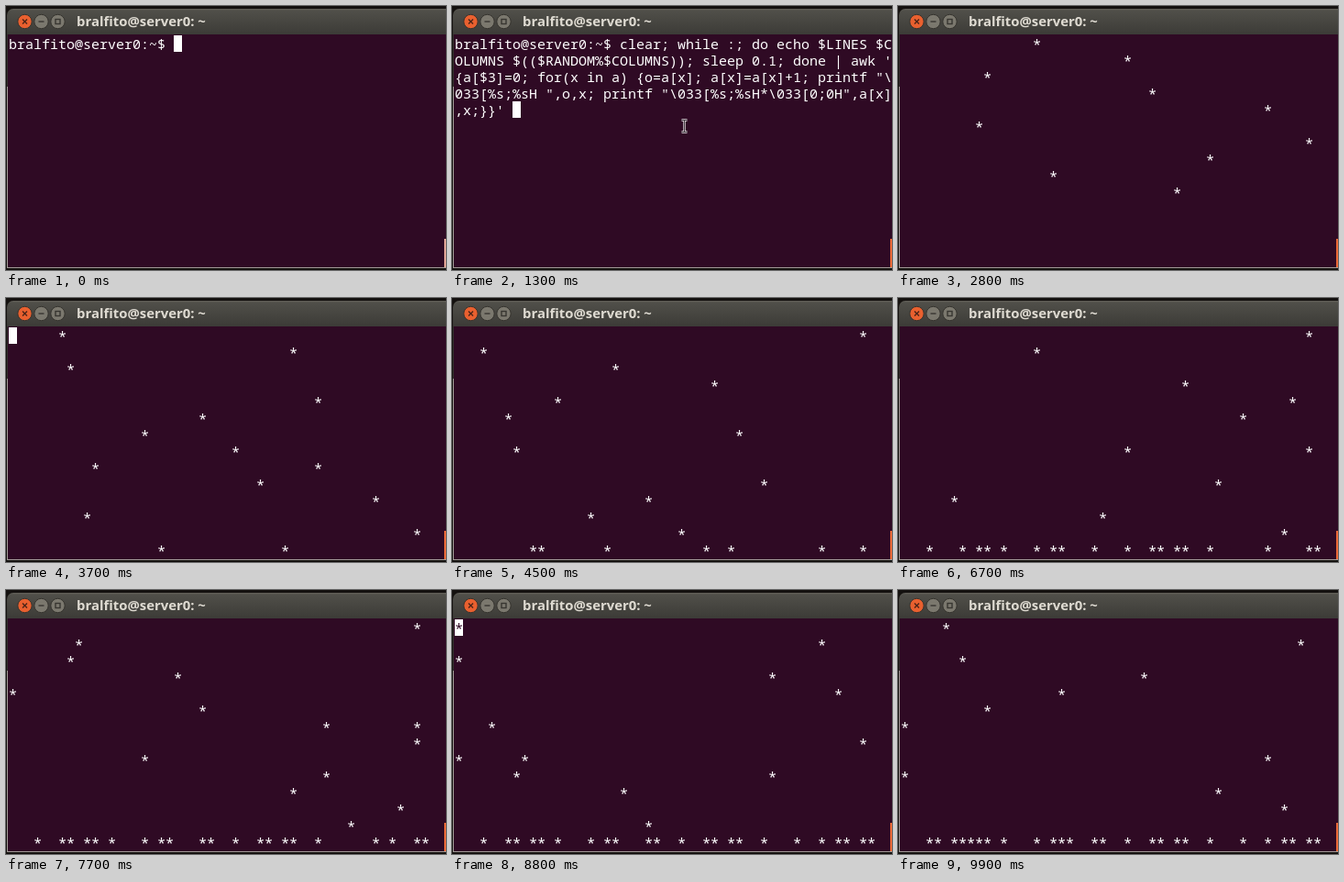
Animation of 480 by 288 pixels, one loop 10000 ms. Source, as an HTML page with a canvas:

```html
<!DOCTYPE html>
<html lang="en">
<head>
<meta charset="utf-8">
<title>Terminal snowfall</title>
<style>
  html, body { margin: 0; width: 100%; height: 100%; overflow: hidden; background: #14110f; }
  canvas { display: block; }
</style>
</head>
<body>
<canvas id="stage" width="480" height="288"></canvas>
<script>
const ctx = document.getElementById('stage').getContext('2d');
const LOOP = 10000, TICK = 100;
const COLS = 53, ROWS = 14, CELL_W = 9, CELL_H = 18, LEFT = 3, TOP = 32;
const BG = '#2f0a24', WHITE = '#ffffff';
const PASTE = 6, ENTER = 13.5, BLINK = 9;

const user = 'bralfito@server0:';
const prompt = user + '~$ ';
const command = prompt + String.raw`clear; while :; do echo $LINES $COLUMNS $(($RANDOM%$COLUMNS)); sleep 0.1; done | awk '{a[$3]=0; for(x in a) {o=a[x]; a[x]=a[x]+1; printf "\033[%s;%sH ",o,x; printf "\033[%s;%sH*\033[0;0H",a[x],x;}}' `;

// Column drawn at each step; 0 and 1 both land in the first cell.
const drops = [
  34, 19, 38, 50, 10, 45, 31, 11, 28, 17, 24, 38, 8, 8, 35, 7, 13, 32, 20, 4, 50,
  51, 47, 25, 7, 39, 50, 28, 42, 42, 48, 35, 17, 17, 50,
  39, 24, 1, 21, 8, 9, 50, 5, 47, 47, 39, 1, 45, 0, 0, 11, 20, 30, 8, 49, 6
];

function rect(color, x, y, w, h) {
  ctx.fillStyle = color;
  ctx.fillRect(x, y, w, h);
}

function line(color, width, ...points) {
  ctx.strokeStyle = color;
  ctx.lineWidth = width;
  ctx.beginPath();
  for (const [x1, y1, x2, y2] of points) {
    ctx.moveTo(x1, y1);
    ctx.lineTo(x2, y2);
  }
  ctx.stroke();
}

function button(x, color) {
  ctx.beginPath();
  ctx.arc(x, 17, 7.7, 0, 2 * Math.PI);
  ctx.fillStyle = color;
  ctx.fill();
  ctx.strokeStyle = '#35332e';
  ctx.lineWidth = 1;
  ctx.stroke();
}

function drawWindow(tick) {
  rect('#14110f', 0, 0, 480, 288);
  const bar = ctx.createLinearGradient(0, 3, 0, 31);
  bar.addColorStop(0, '#63615a');
  bar.addColorStop(0.08, '#504f49');
  bar.addColorStop(1, '#3c3b37');
  ctx.fillStyle = bar;
  ctx.beginPath();
  ctx.roundRect(1, 3, 490, 28, [7, 0, 0, 0]);
  ctx.fill();

  rect(BG, 2, 31, 478, 254);
  rect('#35302e', 1, 31, 1, 57);
  rect('#a39c98', 1, 88, 1, 198);
  rect('#a39c98', 1, 285, 479, 1);
  rect(tick ? '#ec6a38' : '#e2a596', 478, 254, 2, 31);

  button(20.5, '#e9602f');
  button(38.5, '#7b786e');
  button(56.5, '#7b786e');
  line('#4a2418', 1.4, [18, 14.5, 23, 19.5], [23, 14.5, 18, 19.5]);
  line('#383631', 1.4, [35.5, 17, 41.5, 17]);
  ctx.strokeRect(54, 14.5, 5, 5);

  ctx.font = 'bold 14.9px "Open Sans", "Noto Sans", sans-serif';
  ctx.textAlign = 'left';
  ctx.fillStyle = '#dfdbd2';
  ctx.fillText(user + ' ~', 77, 22);
}

function drawCursor(index) {
  rect(WHITE, LEFT + index % COLS * CELL_W, TOP + Math.floor(index / COLS) * CELL_H, CELL_W, CELL_H);
}

function drawShell(text) {
  ctx.font = '15px "Noto Sans Mono", "Liberation Mono", monospace';
  ctx.fillStyle = WHITE;
  for (let i = 0; i < text.length; i += COLS)
    ctx.fillText(text.slice(i, i + COLS), LEFT, TOP + 15 + i / COLS * CELL_H);
  drawCursor(text.length);
}

function drawPointer(y) {
  const beam = [[253.5, y - 6, 253.5, y + 6], [250.5, y - 6.5, 256.5, y - 6.5], [250.5, y + 6.5, 256.5, y + 6.5]];
  line('#e8e4e6', 2.4, ...beam);
  line('#1a1018', 0.8, ...beam);
}

// Runs the awk program: a restarted column leaves its old star behind.
function fall(steps) {
  const height = {}, cells = new Set();
  const cell = (h, x) => (Math.min(Math.max(h, 1), ROWS) - 1) * COLS + Math.max(x, 1) - 1;
  for (const drop of drops.slice(0, steps)) {
    height[drop] = 0;
    for (const x in height) {
      cells.delete(cell(height[x], x));
      cells.add(cell(++height[x], x));
    }
  }
  return cells;
}

function drawStars(tick) {
  const cells = fall(Math.floor((tick - 11.85) / 1.545));
  const cursorOn = Math.floor((tick - ENTER) / BLINK) % 2 === 0;
  if (cursorOn) drawCursor(0);
  ctx.font = '16px "Noto Sans Mono", "Liberation Mono", monospace';
  ctx.textAlign = 'center';
  for (const i of cells) {
    ctx.fillStyle = cursorOn && i === 0 ? BG : WHITE;
    ctx.fillText('*', LEFT + (i % COLS + 0.5) * CELL_W, TOP + Math.floor(i / COLS) * CELL_H + 17);
  }
}

function draw(now) {
  const tick = Math.floor(now % LOOP / TICK);
  drawWindow(tick);
  if (tick < ENTER) {
    drawShell(tick < PASTE ? prompt : command);
    if (tick > 2) drawPointer(131 + Math.max(0, PASTE - tick) * 45);
  } else {
    drawStars(tick);
  }
}

const start = performance.now();
function loop() {
  draw(performance.now() - start);
  requestAnimationFrame(loop);
}
loop();
</script>
</body>
</html>
```
